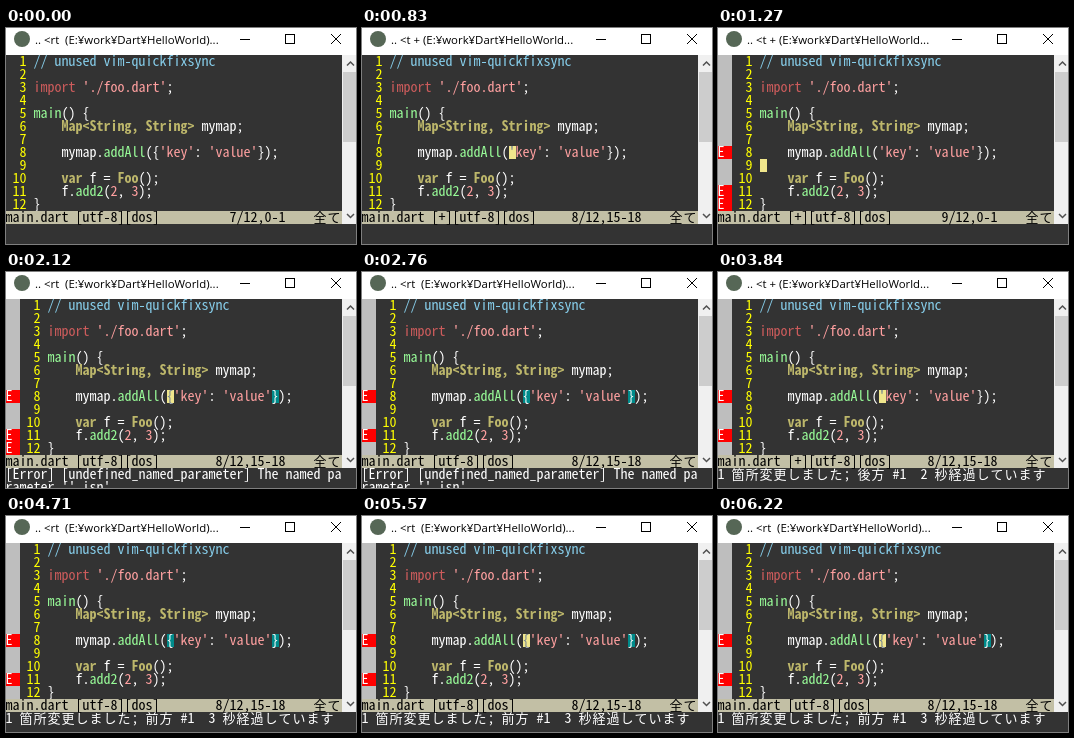
An HTML page with a canvas for the animation above (6.35 s loop, 350 by 216 pixels).

```html
<!DOCTYPE html>
<html lang="ja">
<head>
<meta charset="utf-8">
<style>
html, body { margin: 0; width: 100%; height: 100%; overflow: hidden; background: #333; }
canvas { display: block; }
</style>
</head>
<body>
<canvas id="stage" width="350" height="216"></canvas>
<script>
const ctx = document.getElementById('stage').getContext('2d');
const LOOP = 6350, CELL_W = 7, CELL_H = 13, TOP = 27, COLUMNS = 48;
const MONO = '"Noto Sans Mono CJK JP", "Noto Sans Mono", monospace';
const WIDE = '"Noto Sans Mono CJK JP", "Noto Sans CJK JP", "Noto Sans CJK", sans-serif';
const COLOR = {
  bg: '#333333', text: '#ffffff', number: '#ffff00', comment: '#87ceeb',
  include: '#cd5c5c', string: '#ffa0a0', type: '#bdb76b', call: '#98fb98',
  status: '#c2bfa5', cursor: '#f0e68c', onCursor: '#708090', match: '#008b8b',
  signs: '#bebebe', error: '#ff0000', track: '#f0f0f0', thumb: '#cdcdcd', arrow: '#505050'
};

// Size at which one half-width character fills a cell.
ctx.font = `100px ${MONO}`;
const MONO_SIZE = 100 * CELL_W / ctx.measureText('0').width;

// Each line is a list of [style, text] pairs.
const codeLines = brace => [
  [['comment', '// unused vim-quickfixsync']],
  [],
  [['include', 'import'], ['string', " './foo.dart'"], ['text', ';']],
  [],
  [['call', 'main'], ['text', '() {']],
  [['type', '    Map<String, String>'], ['text', ' mymap;']],
  [],
  [['text', '    mymap.'], ['call', 'addAll'], ['text', '(' + brace], ['string', "'key'"],
   ['text', ': '], ['string', "'value'"], ['text', '});']],
  [],
  [['type', '    var'], ['text', ' f = '], ['type', 'Foo'], ['text', '();']],
  [['text', '    f.'], ['call', 'add2'], ['text', '('], ['string', '2'], ['text', ', '],
   ['string', '3'], ['text', ');']],
  [['text', '}']]
];

const elapsed = (direction, seconds) =>
  [`1 箇所変更しました; ${direction} #1  ${seconds} 秒経過しています`];
const errorText = [
  '[Error] [undefined_named_parameter] The named pa',
  "rameter '' isn'"
];

// Each step changes some of the editor's state; "hide" lists cursor-off intervals.
const steps = [
  { at: 0, line: 7, edited: false, signs: null, message: [] },
  { at: 620, line: 8 },
  { at: 830, edited: true },
  { at: 1270, line: 9, signs: [8, 11, 12] },
  { at: 2120, line: 8, edited: false, message: errorText },
  { at: 2330, signs: [8, 11] },
  { at: 2990, edited: true, message: elapsed('後方', 2) },
  { at: 4060, edited: false, message: elapsed('前方', 3) }
];
const hide = [[0, 210], [1910, 2120], [2760, 2990], [3630, 3840],
              [4710, 4920], [5350, 5570], [6000, 6220]];

function fill(color, x, y, w, h) {
  ctx.fillStyle = color;
  ctx.fillRect(x, y, w, h);
}

function strokePath(color, width, ...points) {
  ctx.strokeStyle = color;
  ctx.lineWidth = width;
  ctx.beginPath();
  for (const [x, y] of points) ctx.lineTo(x, y);
  ctx.stroke();
}

// Draws text on the cell grid and returns the x after it.
function put(text, x, y, color, bold = false) {
  ctx.fillStyle = color;
  for (const ch of text) {
    const wide = ch > '\u2fff';
    if (ch !== ' ') {
      ctx.font = wide ? `13px ${WIDE}` : `${bold ? 'bold ' : ''}${MONO_SIZE}px ${MONO}`;
      ctx.fillText(ch, x - 0.5, y + 11);
    }
    x += wide ? 2 * CELL_W : CELL_W;
  }
  return x;
}

function cell(ch, x, y, back, color) {
  fill(back, x, y, CELL_W, CELL_H);
  put(ch, x, y, color);
}

function drawTitle(edited) {
  fill('#ffffff', 0, 0, 350, TOP);
  ctx.fillStyle = '#566756';
  ctx.beginPath();
  ctx.arc(16, 11, 8, 0, 2 * Math.PI);
  ctx.fill();

  ctx.fillStyle = '#000000';
  ctx.font = '11.4px "Open Sans", "Noto Sans", sans-serif';
  ctx.fillText(edited ? '.. <t + (E:¥work¥Dart¥HelloWorld...'
                      : '.. <rt  (E:¥work¥Dart¥HelloWorld)...', 29, 16);

  strokePath('#000000', 1, [234, 11.5], [244, 11.5]);
  ctx.strokeRect(279.5, 6.5, 9, 9);
  strokePath('#000000', 1, [325, 6], [335, 16]);
  strokePath('#000000', 1, [335, 6], [325, 16]);
}

function drawScrollbar() {
  const x = COLUMNS * CELL_W, middle = x + 8.5;
  fill(COLOR.track, x, TOP, 350 - x, 13 * CELL_H);
  fill(COLOR.thumb, x + 1, 44, 350 - x, 70);
  const arrow = (tip, base) =>
    strokePath(COLOR.arrow, 1.5, [middle - 3.5, base], [middle, tip], [middle + 3.5, base]);
  arrow(34, 37.5);
  arrow(189.5, 186);
}

function drawCode({ line, edited, signs }, cursorOn) {
  const signWidth = signs ? 2 * CELL_W : 0;
  const left = signWidth + 4 * CELL_W;
  const rowY = n => TOP + (n - 1) * CELL_H;

  codeLines(edited ? '' : '{').forEach((parts, i) => {
    const n = i + 1, y = rowY(n);
    if (signs) {
      const failed = signs.includes(n);
      fill(failed ? COLOR.error : COLOR.signs, 0, y, signWidth, CELL_H);
      if (failed) put('E', 0, y, COLOR.text);
    }
    put(String(n).padStart(3), signWidth, y, COLOR.number);
    let x = left;
    for (const [style, text] of parts) x = put(text, x, y, COLOR[style], style === 'type');
  });

  const onCall = line === 8;
  const x = left + (onCall ? 17 * CELL_W : 0), y = rowY(line);
  if (onCall && !edited) {
    cell('{', x, y, COLOR.match, COLOR.text);
    cell('}', left + 32 * CELL_W, y, COLOR.match, COLOR.text);
  }
  if (cursorOn) {
    const under = !onCall ? ' ' : edited ? "'" : '{';
    cell(under, x, y, COLOR.cursor, COLOR.onCursor);
  }
}

function drawStatus({ line, edited, message }) {
  const y = TOP + 12 * CELL_H;
  fill(COLOR.status, 0, y, COLUMNS * CELL_W, CELL_H);
  put(`main.dart ${edited ? '[+]' : ''}[utf-8][dos]`, 0, y, '#000000');
  const ruler = `${line}/12,${line === 8 ? '15-18' : '0-1'}`;
  put(ruler.padStart(10) + '    全て', 30 * CELL_W, y, '#000000');
  message.forEach((text, i) => put(text, 0, y + (i + 1) * CELL_H, COLOR.text));
}

function draw(now) {
  const t = now % LOOP;
  const state = Object.assign({}, ...steps.filter(step => step.at <= t));
  const cursorOn = !hide.some(([from, to]) => t >= from && t < to);
  fill(COLOR.bg, 0, 0, 350, 216);
  drawTitle(state.edited);
  drawCode(state, cursorOn);
  drawStatus(state);
  drawScrollbar();
}

const start = performance.now();
function tick() {
  draw(performance.now() - start);
  requestAnimationFrame(tick);
}
tick();
</script>
</body>
</html>
```
